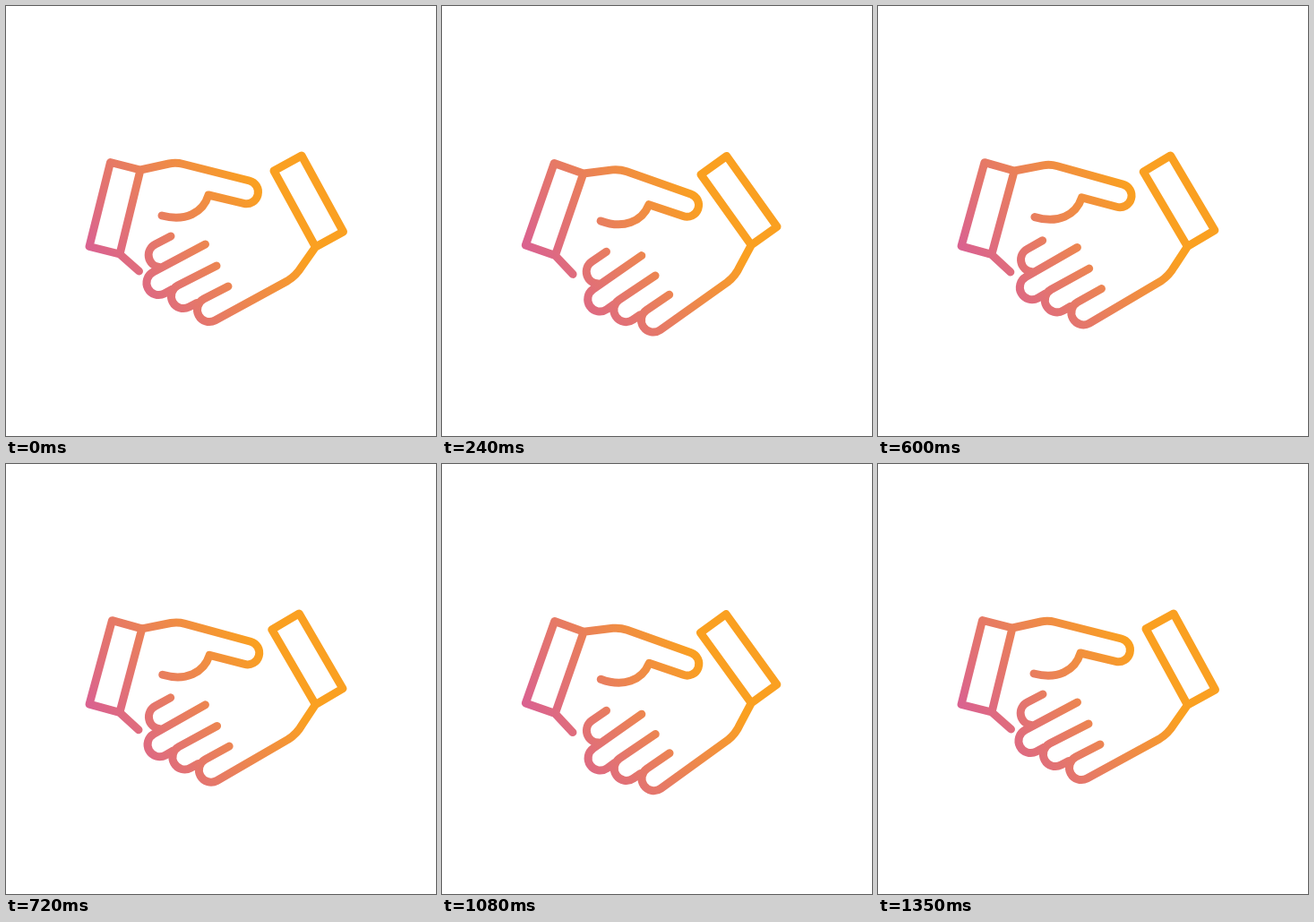
Recreate the animation shown at these times as an HTML page. Size 480 by 480 pixels, loop 2.01 s.

```html
<!DOCTYPE html>
<html lang="en">
<head>
<meta charset="utf-8">
<title>Handshake</title>
<style>
  html, body { margin: 0; height: 100%; overflow: hidden; background: #fff; }
  svg { display: block; width: 100vw; height: 100vh; }
  path { fill: none; stroke: url(#warm); stroke-width: 9; stroke-linecap: round; stroke-linejoin: round; }
</style>
</head>
<body>
<svg viewBox="0 0 480 480">
  <defs>
    <linearGradient id="warm" gradientUnits="userSpaceOnUse" x1="93" y1="269" x2="253" y2="161">
      <stop offset="0" stop-color="#da628f"/>
      <stop offset="1" stop-color="#faa021"/>
    </linearGradient>
  </defs>
  <!-- cuff, thumb and palm, wrist -->
  <path id="left" d="M116.5 174.5L150 183L127 277L93 268.5Z
    M150 183L182 176Q190 174.5 198 176.5L271.6 195A13 13 0 0 1 265.3 220.3L226 211C220 231 200 241 174 234
    M127 277L148.5 296"/>
  <!-- cuff, arm and little finger, remaining fingers -->
  <path id="right" d="M330 167L376.5 252L345.5 269L299 184Z
    M345.5 269L330 291Q324 301 314 307L233.3 351A13.5 13.5 0 0 1 220.7 327.1L248 313
    M235 290L191.7 312A13.5 13.5 0 0 0 204.3 336L213 331.5
    M222.5 266L164.2 297A13.5 13.5 0 0 0 176.8 321L186 316
    M184 257L166.7 266A13.5 13.5 0 0 0 171 291.5"/>
</svg>
<script>
  const LOOP = 2010, STEP = 30, SWING = 1000 / 3, SWINGS = 4;
  const left = document.getElementById("left");
  const right = document.getElementById("right");

  // Two linear down-and-up shakes, then rest.
  function shake(ms) {
    const phase = ms / SWING;
    return phase >= SWINGS ? 0 : 1 - Math.abs(phase % 2 - 1);
  }

  function draw() {
    const ms = Math.floor(performance.now() % LOOP / STEP) * STEP;
    const amount = shake(ms);
    left.setAttribute("transform", `rotate(${7.2 * amount} 110 271)`);
    right.setAttribute("transform", `rotate(${-9.5 * amount} 328 270)`);
    requestAnimationFrame(draw);
  }
  draw();
</script>
</body>
</html>
```
